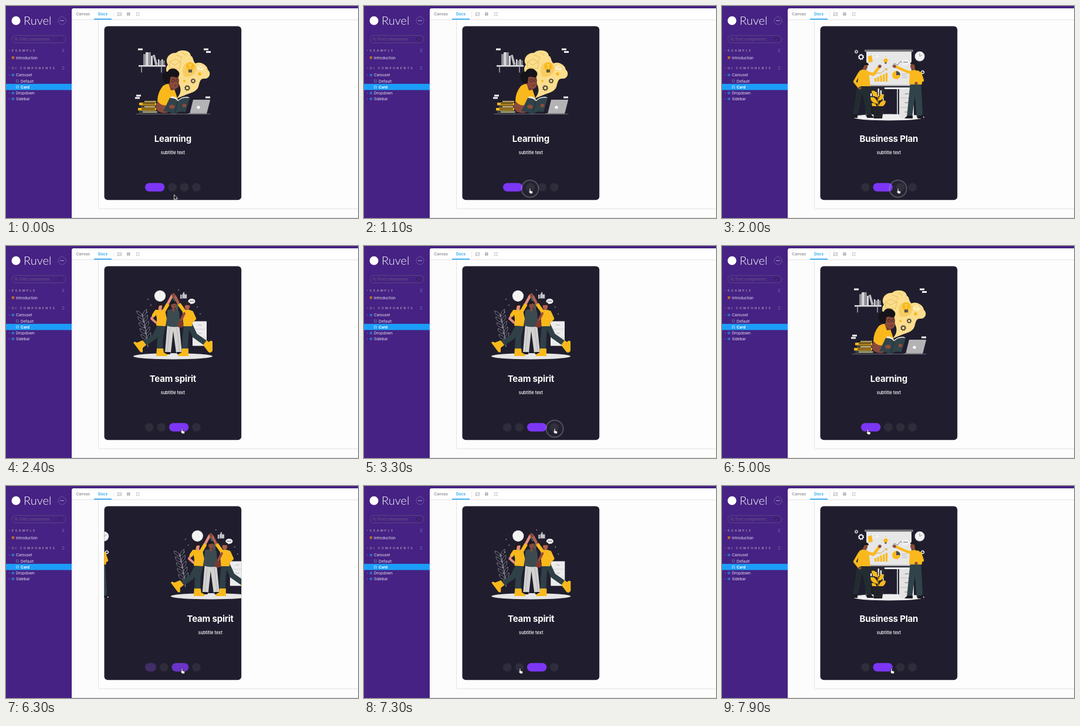
An HTML page for the animation above (8 s loop, 600 by 362 pixels).

```html
<!DOCTYPE html>
<html lang="en">
<head>
<meta charset="utf-8">
<title>Carousel card</title>
<style>
html, body { margin: 0; width: 100%; height: 100%; overflow: hidden; background: #452283; }
svg { display: block; width: 600px; height: 362px; font-family: Inter, "Liberation Sans", sans-serif; }
.head { font-size: 5px; font-weight: 700; letter-spacing: 2.5px; fill: #a08cb4; }
.item { font-size: 6.5px; fill: #ece6f6; }
.tab { font-size: 6.5px; font-weight: 600; }
.title { font-size: 15px; font-weight: 700; letter-spacing: -.2px; fill: #fff; text-anchor: middle; }
.sub { font-size: 7.4px; font-weight: 500; fill: #fff; text-anchor: middle; }
</style>
</head>
<body>
<svg id="stage" viewBox="0 0 600 362" xmlns="http://www.w3.org/2000/svg"></svg>
<script>
const LOOP = 8000, STEP = 234;
const GOLD = '#f9b91c', PALE = '#fbdd8c', DARK = '#1b1b22', SLATE = '#30434a', SKIN = '#8a4a3b', PINK = '#e58f7d', SNOW = '#f3f3f3', GREY = '#b4b4b7', CARD = '#201e2e', BRONZE = '#87621a';

const path = (d, fill) => `<path d="${d}" fill="${fill}"/>`;
const line = (d, color, w = 1, cap = 'round') => `<path d="${d}" fill="none" stroke="${color}" stroke-width="${w}" stroke-linecap="${cap}" stroke-linejoin="round"/>`;
const disc = (x, y, r, fill, ry = r) => `<ellipse cx="${x}" cy="${y}" rx="${r}" ry="${ry}" fill="${fill}"/>`;
const ring = (x, y, r, color, w = 1) => `<circle cx="${x}" cy="${y}" r="${r}" fill="none" stroke="${color}" stroke-width="${w}"/>`;
const box = (x, y, w, h, fill, r = 0) => `<rect x="${x}" y="${y}" width="${w}" height="${h}" rx="${r}" fill="${fill}"/>`;
const text = (x, y, cls, str, more = '') => `<text x="${x}" y="${y}" class="${cls}" ${more}>${str}</text>`;
const gear = (x, y, r, color) => ring(x, y, r, color, r * .55) +
  `<circle cx="${x}" cy="${y}" r="${r * 1.35}" fill="none" stroke="${color}" stroke-width="${r * .45}" stroke-dasharray="${r * .53}"/>`;
const bubble = (x, y) => disc(x, y, 6, SNOW, 4.4) + path(`M${x - 4} ${y + 2}l-1 5 5-3z`, SNOW) +
  [-2.5, 0, 2.5].map(d => disc(x + d, y, .8, DARK)).join('');
const bulb = (x, y, r) => disc(x, y, r, GOLD) + box(x - r * .45, y + r * .8, r * .9, r * .7, '#5d5340', .6);

function learning() {
  let s = [[225, 72.5], [337, 72.5], [341, 77], [222, 151.5], [220, 155.5], [340, 154.5]]
    .map(([x, y]) => box(x, y, 8, 3, SNOW)).join('');
  // Shelf with books
  s += box(226, 101, 46, 2.6, '#dcdcdf') + line('M231 104V113M265 104V113', GREY, 1.4);
  s += box(234, 82, 4, 19, '#8d8d94') + box(238, 79, 5, 22, '#d2d2d6') + box(243.5, 79, 3, 22, '#a0a0a6') + box(247, 85, 3, 16, '#dadadd');
  s += path('M250 84l3.5-1 5 17-4 1z', '#b9b9bf');
  [0, 1, 2, 3].forEach(i => s += box(259 + i * 3, 91 + i % 2 * 2, 2.4, 10 - i % 2 * 2, i % 2 ? '#8d8d94' : '#d8d8dc'));
  // Cloud of ideas
  s += path('M291 158C302 146 298 135 288 124C273 118 270 108 276 100C270 91 278 79 290 80C297 73 314 75 315 85C320 87 318 94 323 98C332 94 343 101 344 109C351 115 346 125 338 124C332 124 331 127 329 134C327 147 315 148 308 151Z', PALE);
  s += path('M301 111C301 92 323 91 325 107C324 117 313 124 303 120Z', '#f7cd61');
  s += line('M279 95l9-4 10 4-2 12-17-2zM279 95l8 6 11-6M290 84l10 3-2 5M300 80l7 4', '#ddb658', .8);
  s += bulb(314, 103, 7) + line('M314 107v-5l-2-3m2 3l2-3', '#fff0bd', .8);
  s += path('M327 101l10 2-1 7-10-2z', '#fff2c6') + line('M327 101l4 5 6-3', '#d8ac49', .7);
  s += gear(319, 128, 2.7, '#4b463d') + gear(309, 140, 3.1, '#4b463d') + disc(330, 116, 2.8, GOLD) + disc(304, 128, 2, GOLD);
  // Reader
  s += path('M267 137Q278 128 286 139L293 160 286 179 261 178Q253 155 267 137Z', GOLD);
  s += path('M278 135l10 0 0 8-7 1z', '#74382e') + path('M276 119Q285 111 294 121L295 134Q293 142 286 142 278 139 276 130Z', SKIN);
  s += path('M268 126C263 118 270 111 276 112C278 105 289 106 292 110C298 114 295 121 292 122C288 123 285 119 280 122L279 132Q268 133 268 126Z', '#171419');
  s += ring(285, 127, 2.5, DARK, .7) + ring(292, 127, 2.4, DARK, .7) + line('M287 136q3 1 4-1', '#482018', .8);
  s += path('M259 163Q267 174 282 167L287 173Q274 188 260 180 252 173 259 163Z', SKIN);
  s += path('M279 157Q290 154 293 162 301 154 313 157L306 181Q294 178 287 186 278 179 268 180Z', SLATE);
  s += path('M281 155q8-2 12 6 7-7 17-6l3 2q-13-2-20 6-3-6-13-6z', SNOW) + line('M293 162l-6 23', '#172b31', .9);
  s += disc(283, 172, 5, SKIN, 3.4) + disc(304, 170, 3.5, SKIN, 3);
  // Laptop, stacked books
  s += path('M319 160h28q1 0 1 1l-6 23h-29z', '#b3b3b5') + path('M312 183h30v2h-35z', '#77777d') + disc(328, 173, 2.6, '#fff');
  [[230, 161, 28, DARK], [227, 165, 29, GOLD], [230, 170, 26, '#4b4338'], [225, 174, 31, GOLD], [227, 179, 32, SLATE]]
    .forEach(([x, y, w, f]) => s += box(x, y, w, 4.5, f, .8) + box(x + 6, y + 1.2, w - 8, 1.5, f === GOLD ? DARK : PALE));
  return s + line('M222 184.5H348', '#8d8790', .7);
}

function business() {
  let s = disc(284, 190, 61, '#eeeeee', 5.5);
  s += line('M253 80L246 188M318 80L324 188', '#55565b', 2);
  s += box(243, 74.5, 83, 4, '#77777a', 1) + box(246, 78, 77, 57, '#e7e7e8') + box(244, 135, 81, 2, '#9d9da0');
  // Board contents
  s += path('M249 86l6-2 2 11-7 2z', GOLD) + box(257, 82, 9, 6, '#fafafa') + line('M258 84h6m-6 2h5', '#a4a4a7', .6);
  [0, 1, 2, 3, 4].forEach(i => s += box(260 + i * 4.7, 123 - i * 2.2, 3.3, 6 + i * 2.2, GOLD));
  s += line('M260 117l6-3 4 1 11-8m-3 0h3v3', '#d69b16', .9) + bulb(279, 93, 3.6);
  s += line('M279 87v-1m-5 7h-2m13 0h1', GOLD, .7) + line('M290 103l4-5 5 3 5-6 5 2 5-3', '#5b5c60', .8);
  s += disc(297, 118, 7, GOLD) + path('M297 118V111A7 7 0 0 1 304 118Z', '#474c50') + line('M307 116h9m-9 3h7m-7 3h9', GREY, .9) + bubble(313, 96);
  s += disc(337, 86, 8.4, SNOW) + ring(337, 86, 7, '#dad9dc', .7) + line('M337 81v5l4-2', '#77777d', .8);
  s += gear(229, 78, 2, SNOW) + gear(237, 87, 3.3, SNOW) + gear(342, 113, 2.2, SNOW);
  // Desk and plant
  s += box(271, 139, 60, 3, '#f5f5f5') + box(302, 142, 25, 49, '#e3e3e4') + line('M304 157h21m-21 16h21', '#b6b6b8', .8) + line('M312 150h6m-6 15h6m-6 16h6', '#77777b', 1);
  s += line('M276 142l-3 48M299 142v48', '#eeeeee', 1.5);
  s += box(250, 137, 27, 20, '#29272f');
  [5, 9, 7, 13, 10].forEach((h, i) => s += box(253 + i * 4.2, 154 - h, 2.3, h, SNOW));
  s += line('M266 174V147', '#c58d14', 1.4);
  [[149, -11], [155, 10], [160, -13], [166, 13], [170, -11]].forEach(([y, d]) =>
    s += path(`M266 ${y + 7}Q${266 + d * .3} ${y - 7} ${266 + d} ${y - 4}Q${266 + d} ${y + 6} 266 ${y + 7}Z`, GOLD));
  s += path('M256 171h20l-3 21h-14z', '#222229');
  // Presenter on the left
  s += path('M231 133h20l4 54h-8l-8-39-8 38h-8z', '#222d31') + path('M222 185h9v6h-12zM247 186h8l5 5h-13z', DARK);
  s += path('M234 111Q242 105 250 112L253 137H230Z', GOLD) + line('M248 114L258 117 268 104', GOLD, 5) + disc(269, 103, 2.8, SKIN);
  s += line('M234 115L226 129 234 139', GOLD, 4.5) + disc(235, 140, 2.6, SKIN);
  s += disc(243, 103, 5.3, SKIN, 6.3) + path('M236 104q-1-8 7-8 7 0 7 5l-7 0-3 6z', DARK);
  // Presenter on the right
  s += path('M321 130h18l3 53-3 7h-7l-3-37-5 37h-9z', SLATE) + path('M316 187h9v5h-14zM334 187h8l2 5h-11z', DARK);
  s += path('M320 111Q331 106 338 113L341 134H319Z', GOLD) + line('M322 114L313 111 297 104', GOLD, 4.5) + disc(294, 103, 2.7, SKIN);
  s += line('M338 115L342 127 333 132', GOLD, 4.5) + disc(331, 132, 2.6, SKIN);
  return s + disc(326, 103, 5, SKIN, 6.1) + path('M321 99q1-6 9-4 8 4 4 14-4 4-5-3l-1-6z', DARK);
}

function team() {
  const pants = '#2f4046';
  let s = disc(284.5, 188.3, 67.5, '#e6e6e6', 5.2);
  s += disc(262.5, 85.3, 9.6, SNOW) + ring(262.5, 85.3, 8.4, '#e6e6e8', .7) + line('M262.5 80v5l3 2', '#dedee0', .7);
  s += path('M297 83h2.5v7H297zM300.3 83.5l2.5-5q2.2 0 1.2 4h4.2v7h-7.9z', '#c3c2c7') + bubble(316.5, 94.3);
  [[247, 101], [240, 113], [326, 104], [294, 75], [242, 91], [331, 116]].forEach(([x, y]) => s += disc(x, y, .7, SNOW));
  // Plant and cabinet
  s += line('M242 172Q239 142 232 116', '#c1c0c6', .8);
  [120, 130, 140, 150, 160].forEach(y => {
    const x = 242 - (172 - y) * .18;
    s += line(`M${x} ${y}q-9-1-10-9 8 1 10 9q1-9 7-12 1 9-7 12`, '#a09ea8', .7);
  });
  s += box(318, 128.5, 24, 42, '#ececed') + line('M320 142h20m-20 14h20', '#c4c4c7', .8) + line('M328 135h5m-5 14h5m-5 14h5', '#aaaaae', .9);
  // Middle member
  s += path('M275 132h20l5 50h-10l-5-37-4 37h-10Z', '#d2d2d0') + line('M279 140l-4 41m16-41l5 40', '#a9aaac', .7);
  s += path('M270 181h10v4h-14zM291 181h9l5 4h-13z', DARK);
  s += line('M291 112L291 99 286 88', '#46565a', 4.5) + path('M275 110Q285 105 295 111L297 137Q285 140 273 136Z', '#3c4b50');
  s += path('M283 107h5l-2 7z', SKIN) + disc(285.5, 101.5, 4.2, SKIN, 5.6) + path('M280.5 100q0-6 5.5-6 6 0 5 6l-3-2z', DARK);
  // Left member
  s += line('M263 136L253 155 237 166', pants, 9) + line('M267 136L263 155 262 178', pants, 10, 'butt');
  s += path('M233 161l6 8-6 5 0 6q0 3-4 1l-12-16q2-3 6 0zM257 175h11l1 7q6 2 6 6h-19z', GOLD);
  s += line('M256 112L248 124 256 131', PINK, 4) + line('M256 112L252 118', GOLD, 6);
  s += path('M254 111Q261 106 271 110L274 124 272 137 256 136Q259 124 254 111Z', GOLD);
  s += line('M276 98L283 85', PINK, 4.5) + line('M268 113L276 99', GOLD, 6, 'butt');
  s += path('M260 106h5l1 6z', PINK) + disc(262, 103.5, 4.2, PINK, 5.2) + path('M255.5 106q-1-10 7-9.5 5 1 4.5 4.5l-6 1-2 7z', '#241b20');
  // Right member
  s += line('M314 136L322 153 339 165', pants, 9) + line('M308 136L306 155 305 178', pants, 10, 'butt');
  s += path('M336 169l6-8 4 3q3-4 6-1v16q-3 5-7 2zM300 175h11v13h-18q0-4 6-6z', GOLD);
  s += path('M301 111Q309 106 318 111L320 122 317 137H302Z', GOLD) + line('M317 113L322 124 314 131', GOLD, 4.5);
  s += line('M294 98L288 86', '#b0604f', 4.5) + line('M305 113L295 99', GOLD, 6, 'butt') + disc(285.5, 84, 2.8, SKIN, 3.5);
  s += line('M304 115L298 127', '#9a4a3d', 4) + box(292.5, 129, 10, 10, '#7c3a30', 3);
  return s + disc(309, 103.5, 4.2, '#b0604f', 5.2) + path('M304.5 101q0-5 6-5 6 1 4 8l-2-3z', '#282027');
}

function success() {
  const cloud = (x, y, w) => path(`M${x} ${y}q4-4 10-2 4-6 10-3 5-3 8 1h${w - 28}q4 0 5 4z`, '#77757e');
  const pan = (x, y) => path(`M${x - 17} ${y}h34q-3 13-17 13t-17-13z`, '#c99420') + box(x - 18, y - 1, 36, 2.5, BRONZE, 1);
  let s = cloud(234, 77, 36) + cloud(307, 112, 35) + cloud(228, 118, 30);
  // Skyline
  [[246, 161, 12], [257, 149, 13], [270, 131, 15], [297, 143, 14], [310, 155, 14]].forEach(([x, y, w], i) => {
    s += box(x, y, w, 195 - y, i % 2 ? '#bfc0c1' : '#e7e7e7');
    for (let v = y + 4; v < 192; v += 5) s += line(`M${x + 2} ${v}h${w - 4}`, '#98999c', .8);
  });
  // Scale
  s += path('M282 88h5l2 96h-9z', BRONZE) + box(271, 184, 31, 11, '#c08c1c') + box(259, 190, 52, 5, BRONZE);
  s += line('M250 109Q267 112 285 103 302 93 325 98 336 99 344 93', BRONZE, 3.5) + disc(284, 101, 4, '#c08c1c');
  s += line('M252 109L236 149M252 109L268 149M324 98L309 134M324 98L341 134', '#a78132', .7);
  s += disc(251, 142, 10, GOLD) + line('M246 141l4 4 8-10', DARK, 2) + pan(251, 149);
  [[315, 128], [322, 124], [329, 128], [321, 130], [333, 131]].forEach(([x, y]) => s += disc(x, y, 4.5, GOLD) + ring(x, y, 2.5, '#c48d14', .7));
  s += pan(324, 134);
  // Badges
  [[285, 74], [244, 93], [324, 93], [229, 130], [340, 129], [242, 167], [327, 167]]
    .forEach(([x, y]) => s += disc(x, y, 11.5, '#eeeeed') + ring(x, y, 10.4, '#d7d7d8', .6));
  s += disc(287, 72, 5.5, SLATE) + line('M282 72h10M287 67v10m-4-8q4 2 8 0m-8 6q4-2 8 0', '#eee', .6) + path('M278 79l5-3 7 3-5 3z', GOLD);
  s += path('M238 95q0-8 8-9 5 2 6 6z', SLATE) + line('M245 92l2 8', GOLD, 1.2);
  s += ring(324, 93, 6, GOLD, 2) + ring(324, 93, 2.5, '#bc7f20', 1.5) + line('M324 93l7-6', DARK);
  s += path('M222 129h3v8h-3zM226 129l4-6q2 1 1 5h5l-1 8h-9z', GOLD);
  s += path('M333 130q1-7 8-8 6 2 6 7z', GOLD) + line('M340 129v6', SLATE, 1.2);
  s += box(235, 164, 6, 7, SLATE) + box(242, 164, 7, 7, GOLD) + disc(241, 167, 1.6, SLATE) + disc(245, 163, 1.6, GOLD);
  s += box(320, 164, 14, 8, '#c38b1c', 1) + line('M324 163v-2h6v2M320 168h14', SLATE, 1.1);
  s += disc(304, 88, 6.5, SNOW) + line('M301 88l2 2 4-5', '#e19f20', 1.4);
  // Leaning man
  s += path('M289 136L302 136 311 163 324 185 316 192 300 164 295 190 286 190Z', '#27383d');
  s += path('M284 189h11v5h-15zM316 189l7-5 5 8q-3 3-8 3z', DARK);
  s += path('M288 109Q297 103 304 112L305 139 287 140Z', SLATE) + line('M301 112L311 109 318 104', SLATE, 4.5) + line('M290 114L285 128 295 134', '#3d5057', 4.5);
  s += disc(319, 103, 2.2, '#cf8271') + path('M293 107l5-1 0 5-4 3z', SNOW);
  return s + disc(293, 100, 4.6, '#d28673', 5.8) + path('M288 99q-1-7 7-7 6 3 3 9l-2-4z', '#74301f');
}

const SLIDES = [[learning, 'Learning'], [business, 'Business Plan'], [team, 'Team spirit'], [success, 'Success']];

function sidebar() {
  const block = (x, y, color) => box(x, y, 4.4, 4.4, color, .8);
  const story = (y, color) => line(`M18 ${y}h3.2v4.4l-1.6-1.3-1.6 1.3z`, color, .7);
  const arrow = y => path(`M4.5 ${y}h2.4l-1.2 1.8z`, '#8068a8');
  let s = disc(17, 25, 7.5, '#fff');
  s += text(30, 32, '', 'Ruvel', 'font-family="Lato, sans-serif" font-size="20" font-weight="300" fill="#fff"');
  s += ring(95.5, 25, 6.6, '#8872b0', .6) + [-2.3, 0, 2.3].map(d => disc(95.5 + d, 25, .8, '#e5dcf3')).join('');
  s += `<rect x="10" y="50.3" width="92" height="12.6" rx="6.3" fill="none" stroke="#655080" stroke-width=".8"/>`;
  s += ring(17, 56.3, 1.9, '#6d5782', .8) + line('M18.5 57.8l1.5 1.5', '#6d5782', .8);
  s += text(23, 58.8, '', 'Find components', 'font-size="6.3" fill="#6c5884"');
  s += box(89, 52.7, 8, 7.8, '#3d1f72', 1.5) + text(92, 58.8, '', '/', 'font-size="5.5" fill="#6c5884"');
  s += arrow(75.5) + text(10, 78.4, 'head', 'EXAMPLE') + line('M96 73.7l1.5 1.5 1.5-1.5M96 78.3l1.5-1.5 1.5 1.5', '#ab98c5', .7);
  s += block(9.7, 86, '#bd6a2d') + text(17, 90.6, 'item', 'Introduction');
  s += arrow(105) + text(10, 107.9, 'head', 'UI COMPONENTS') + line('M96 104.7l1.5-1.5 1.5 1.5M96 107l1.5 1.5 1.5-1.5', '#ab98c5', .7);
  s += box(0, 132.9, 112, 10.6, '#1c9df8');
  [['Carousel', 120.3], ['Dropdown', 151], ['Sidebar', 161]].forEach(([name, y]) =>
    s += arrow(y - 3) + block(9.7, y - 4.6, '#2a6fc6') + text(17, y, 'item', name));
  s += story(126, '#6f8da8') + text(25, 130.6, 'item', 'Default');
  return s + story(136.2, '#d4ecff') + text(25, 140.7, 'item', 'Card', 'font-weight="700" style="fill:#fff"');
}

function toolbar() {
  let s = path('M112 362V8q0-4 4-4H600V362Z', '#fcfcfc');
  s += `<rect x="157.5" y="15" width="460" height="331.3" rx="2" fill="#fdfdfd" stroke="#dedede" stroke-width=".8"/>`;
  s += path('M112 23V8q0-4 4-4H600V23Z', '#fff') + box(112, 23, 488, .8, '#dedede');
  s += text(119.5, 16.2, 'tab', 'Canvas', 'fill="#8e8e8e"') + text(157, 16.2, 'tab', 'Docs', 'fill="#1ea0f5"') + box(150, 21.6, 30, 1.7, '#1ea0f5');
  s += box(183, 9, .7, 10, '#e3e3e3') + line('M190.8 11.2h5.6v5.2h-5.6zM191.3 15.3l1.8-1.8 1.4 1 1.5-1.3', '#999', .7);
  s += [11.2, 14].map(y => box(206.3, y, 2.2, 2.2, '#999') + box(209.2, y, 2.2, 2.2, '#999')).join('');
  s += line('M222.3 12.5v-1.3h1.4m2 0h1.4v1.3m0 2.6v1.3h-1.4m-2 0h-1.4v-1.3M224 13.8h1.4', '#999', .7);
  return s + box(112, 361.2, 488, .8, '#dcdcdc');
}

const stage = document.getElementById('stage');
stage.innerHTML = `<clipPath id="clip"><rect x="167.5" y="34.5" width="233.7" height="296.8" rx="6"/></clipPath>
${box(0, 0, 600, 362, '#452283')}${sidebar()}${toolbar()}
<g clip-path="url(#clip)">${box(167, 34, 235, 298, CARD)}
${SLIDES.map(([draw, name]) => `<g class="slide">${draw()}${text(284.4, 232, 'title', name)}${text(284.4, 253.4, 'sub', 'subtitle text')}</g>`).join('')}</g>
${SLIDES.map(() => '<rect class="dot" y="302.2" height="14.6" rx="7.3"/>').join('')}
<circle id="press" r="14.6" fill="#fff" fill-opacity=".02" stroke="#aaa8b0" stroke-opacity=".36" stroke-width="2"/>
<path id="arrow" d="M0 0V9L2.2 7 3.6 10.2 5 9.5 3.6 6.5H6.3Z" fill="#111" stroke="#fff" stroke-width=".8"/>
<path id="hand" d="M-1 .5Q0-1.3 1 .5V3.5L4.1 4.3Q5.2 4.7 4.8 6L4 8.6H.2L-2.5 5Q-2.3 3.7-1 4.7Z" fill="#fff" stroke="#111" stroke-width=".7"/>`;

const slides = [...stage.querySelectorAll('.slide')];
const dots = [...stage.querySelectorAll('.dot')];
const [press, arrow, hand] = ['press', 'arrow', 'hand'].map(id => document.getElementById(id));

// Click release time and the slide it opens
const CLICKS = [[1150, 1], [2080, 2], [3420, 3], [4560, 0], [6130, 2], [7300, 1]];
// Pointer: time, x, y
const TRACK = [[800, 286.5, 322], [1000, 283, 312], [1300, 283, 312], [1800, 300, 312], [2600, 300, 312], [3150, 325, 312],
  [3600, 325, 312], [4300, 246, 312], [4650, 246, 312], [4950, 248.5, 313.5], [5250, 248.5, 313.5], [5850, 300, 312],
  [6500, 300, 312], [7050, 266, 312], [7420, 266, 312], [7850, 289, 312]];

const clamp = v => Math.max(0, Math.min(1, v));
const mix = (a, b, k) => a + (b - a) * k;
function bezier(x1, y1, x2, y2) {
  const at = (a, b, u) => 3 * a * u * (1 - u) ** 2 + 3 * b * u * u * (1 - u) + u ** 3;
  return x => {
    if (x <= 0 || x >= 1) return clamp(x);
    let lo = 0, hi = 1;
    for (let i = 0; i < 24; i++) {
      const mid = (lo + hi) / 2;
      if (at(x1, x2, mid) < x) lo = mid; else hi = mid;
    }
    return at(y1, y2, lo);
  };
}
const slideEase = bezier(.25, .1, .25, 1), dotEase = bezier(.4, 0, .2, 1);

function pointer(t) {
  const i = TRACK.findIndex(k => k[0] > t);
  if (i < 1) return (i ? TRACK[TRACK.length - 1] : TRACK[0]).slice(1);
  const [a, b] = [TRACK[i - 1], TRACK[i]];
  const u = (t - a[0]) / (b[0] - a[0]), k = u * u * (3 - 2 * u);
  return [mix(a[1], b[1], k), mix(a[2], b[2], k)];
}

function render(t) {
  let pos = 0, last = 0;
  const on = [1, 0, 0, 0];
  for (const [at, to] of CLICKS) {
    const k = dotEase((t - at) / 350);
    pos += (to - last) * slideEase((t - at) / 300);
    on[last] -= k;
    on[to] += k;
    last = to;
  }
  slides.forEach((g, i) => g.setAttribute('transform', `translate(${(i - pos) * STEP} 0)`));
  let x = 237;
  dots.forEach((d, i) => {
    const w = mix(14.6, 33.3, on[i]);
    d.setAttribute('x', x);
    d.setAttribute('width', w);
    d.setAttribute('fill', `rgb(${mix(47, 124, on[i])},${mix(44, 54, on[i])},${mix(59, 246, on[i])})`);
    x += w + 5.9;
  });
  const [px, py] = pointer(t), place = `translate(${px} ${py})`;
  const down = CLICKS.some(([at]) => t > at - 200 && t < at);
  [press, arrow, hand].forEach(el => el.setAttribute('transform', place));
  press.style.display = down ? '' : 'none';
  arrow.style.display = t < 930 ? '' : 'none';
  hand.style.display = t < 930 ? 'none' : '';
}

const start = performance.now();
function tick() {
  render((performance.now() - start) % LOOP);
  requestAnimationFrame(tick);
}
tick();
</script>
</body>
</html>
```
